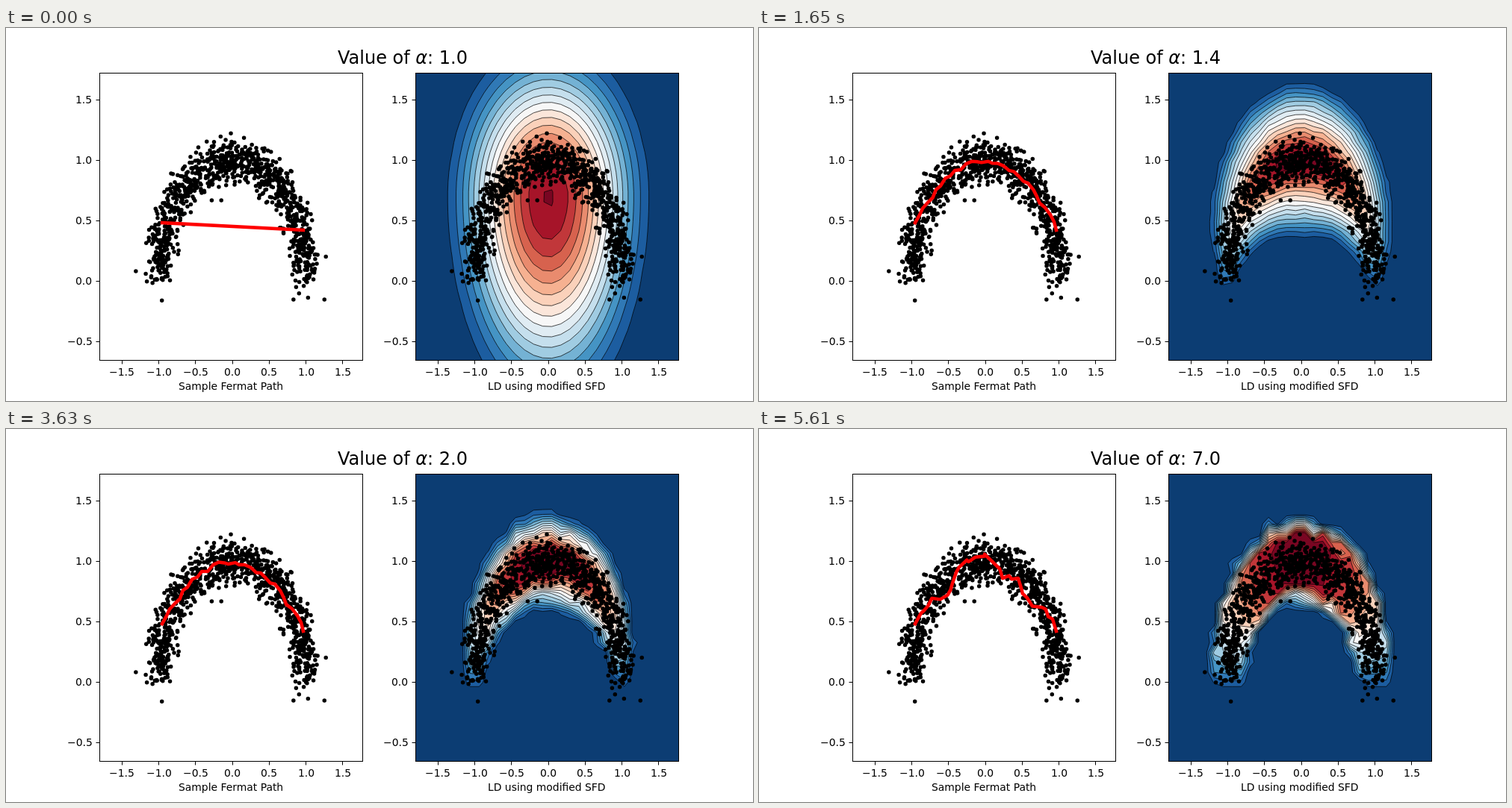
An HTML page with a canvas that plays this animation: 1000x500 px, repeating every 5940 ms.

```html
<!DOCTYPE html>
<html lang="en">
<head>
<meta charset="utf-8">
<title>Fermat path and lens depth</title>
<style>
html, body { margin: 0; width: 100%; height: 100%; overflow: hidden; background: #fff; }
canvas { display: block; width: 1000px; height: 500px; }
</style>
</head>
<body>
<canvas id="stage" width="1000" height="500"></canvas>
<script>
const ctx = document.getElementById('stage').getContext('2d');
const STEP = 330;
const ALPHAS = ['1.0', '1.05', '1.1', '1.2', '1.3', '1.4', '1.5', '1.6', '1.7',
  '1.8', '1.9', '2.0', '2.5', '3.0', '4.0', '5.0', '6.0', '7.0'];
const FONT = '"DejaVu Sans", Verdana, sans-serif';
const TOP = 60.5, W = 352, H = 385, LEFT = 125.5, RIGHT = 548.5;
const UNIT_X = 98.6, UNIT_Y = 162, ZERO_X = 177.5, ZERO_Y = 339;
const BANDS = 17, CELLS = 29;

const mix = (a, b, t) => a + (b - a) * t;
const toX = (left, x) => left + ZERO_X + UNIT_X * x;
const toY = y => ZERO_Y - UNIT_Y * y;

function random(seed) {
  return () => {
    seed = seed + 0x6D2B79F5 | 0;
    let t = Math.imul(seed ^ seed >>> 15, 1 | seed);
    t = t + Math.imul(t ^ t >>> 7, 61 | t) ^ t;
    return ((t ^ t >>> 14) >>> 0) / 4294967296;
  };
}

// Point cloud: a noisy half circle and a few stragglers, in data units
const dots = [[-1.31, 0.08], [1.25, -0.155], [0.83, -0.155], [1.27, 0.2],
  [-0.28, 0.667], [-0.15, 0.667], [0.41, 0.72], [-0.02, 1.22]];
const rnd = random(11);
while (dots.length < 1000) {
  const a = Math.PI * rnd();
  const r = Math.sqrt(-2 * Math.log(1 - rnd())), b = 2 * Math.PI * rnd();
  if (r < 2.35) dots.push([Math.cos(a) + 0.1 * r * Math.cos(b), Math.sin(a) + 0.1 * r * Math.sin(b)]);
}

// Shortest path: a chord at first, then a wandering arc that rises to the ridge
function fermatPath(alpha) {
  const from = [-0.953, 0.481], to = [0.963, 0.42];
  if (alpha === 1) return [from, to];
  const angle = p => Math.atan2(p[1], p[0]);
  const lag = Math.max(0, 1.4 - alpha) / 0.3;
  const radius = 1 - 0.18 * lag * lag - 0.006 * Math.max(0, alpha - 2);
  const sway = 0.02 + 0.009 * (alpha - 1);
  const steps = 30, noise = random(40 + Math.max(2, Math.ceil(alpha)));
  const points = [from];
  let drift = 0;
  for (let i = 1; i < steps; i++) {
    const u = i / steps, ease = Math.min(1, 7 * Math.min(u, 1 - u));
    drift = drift * 0.6 + (noise() - 0.5) * 2 * sway;
    const r = mix(1.06, radius + drift, ease);
    const a = mix(angle(from), angle(to), u) + (noise() - 0.5) * sway;
    points.push([r * Math.cos(a), r * Math.sin(a)]);
  }
  return points.concat([to]);
}

// Depth around one oval centre
function ovalDepth(x, y) {
  const dy = y - 0.7;
  const r = Math.hypot(x / 1.62, dy / (dy > 0 ? 1.55 : 2.15));
  return 8.05 * (1 + Math.cos(Math.PI * Math.min(1, r)));
}

// Depth along the arch: falls toward the feet and away from the ridge
function archDepth(x, y, alpha, wobble) {
  const along = y > 0 ? Math.atan2(Math.abs(x), y) : Math.PI / 2 - y;
  const away = Math.abs(Math.hypot(x, Math.max(0, y)) - 1);
  const core = 0.02 + 0.06 * Math.min(1, alpha - 1) + 0.005 * Math.max(0, alpha - 2) ** 2;
  const edge = Math.max(0.16, 1.125 / alpha - 0.16 - core);
  const shift = wobble * 0.03 * Math.min(1.5, alpha - 1);
  const ridge = 16.8 * (1 - (along / 1.66) ** 2);
  return Math.max(0, ridge - 16 / edge * Math.max(0, away + shift - core));
}

function field(alpha) {
  const oval = Math.max(0, 1 - (alpha - 1) / 0.4) ** 1.8;
  const gain = 1 + 0.25 * oval * (1 - oval);
  const noise = random(5);
  const rows = [];
  for (let j = 0; j <= CELLS; j++) {
    const row = [];
    for (let i = 0; i <= CELLS; i++) {
      const px = RIGHT + i * W / CELLS, py = TOP + j * H / CELLS;
      const x = (px - toX(RIGHT, 0)) / UNIT_X, y = (ZERO_Y - py) / UNIT_Y;
      const arch = archDepth(x, y, alpha, noise() * 2 - 1);
      row.push([px, py, gain * mix(arch, ovalDepth(x, y), oval)]);
    }
    rows.push(row);
  }
  return rows;
}

const stops = ['053061', '2166ac', '4393c3', '92c5de', 'd1e5f0', 'f7f7f7',
  'fddbc7', 'f4a582', 'd6604d', 'b2182b', '67001f']
  .map(h => [0, 2, 4].map(i => parseInt(h.slice(i, i + 2), 16)));

function bandColor(band) {
  const u = (band + 0.4) / (BANDS - 0.2) * 10, i = Math.floor(u);
  return `rgb(${stops[i].map((c, n) => Math.round(mix(c, stops[i + 1][n], u - i)))})`;
}

// Adds the part of one grid cell above the level, and its contour line
function cutCell(quad, level, area, lines) {
  const kept = [], cuts = [];
  quad.forEach((p, n) => {
    const q = quad[(n + 1) % 4];
    if (p[2] >= level) kept.push(p);
    if (p[2] >= level !== q[2] >= level) {
      const t = (level - p[2]) / (q[2] - p[2]);
      const c = [mix(p[0], q[0], t), mix(p[1], q[1], t)];
      kept.push(c);
      cuts.push(c);
    }
  });
  if (!kept.length) return;
  kept.forEach((p, n) => n ? area.lineTo(p[0], p[1]) : area.moveTo(p[0], p[1]));
  area.closePath();
  cuts.forEach((c, n) => n % 2 ? lines.lineTo(c[0], c[1]) : lines.moveTo(c[0], c[1]));
}

function drawDepth(alpha) {
  const rows = field(alpha), lines = new Path2D();
  ctx.fillStyle = bandColor(0);
  ctx.fillRect(RIGHT, TOP, W, H);
  for (let level = 1; level < BANDS; level++) {
    const area = new Path2D();
    for (let j = 0; j < CELLS; j++) {
      for (let i = 0; i < CELLS; i++) {
        const quad = [rows[j][i], rows[j][i + 1], rows[j + 1][i + 1], rows[j + 1][i]];
        cutCell(quad, level, area, lines);
      }
    }
    ctx.fillStyle = bandColor(level);
    ctx.fill(area);
  }
  ctx.strokeStyle = '#000';
  ctx.lineWidth = 0.7;
  ctx.stroke(lines);
}

function drawDots(left) {
  ctx.fillStyle = '#000';
  ctx.beginPath();
  for (const [x, y] of dots) {
    const px = toX(left, x), py = toY(y);
    ctx.moveTo(px + 2.75, py);
    ctx.arc(px, py, 2.75, 0, 7);
  }
  ctx.fill();
}

function drawPath(points) {
  ctx.strokeStyle = '#f00';
  ctx.lineWidth = 4.5;
  ctx.lineJoin = 'round';
  ctx.lineCap = 'square';
  ctx.beginPath();
  points.forEach(([x, y]) => ctx.lineTo(toX(LEFT, x), toY(y)));
  ctx.stroke();
  ctx.lineCap = 'butt';
}

// Text starts on whole pixels; align is 0.5 for centred, 1 for right
function drawText(text, x, y, align) {
  ctx.fillText(text, Math.round(x - ctx.measureText(text).width * align), y);
}

function drawAxes(left, label) {
  const number = v => (v < 0 ? '\u2212' : '') + Math.abs(v).toFixed(1);
  ctx.strokeStyle = ctx.fillStyle = '#000';
  ctx.lineWidth = 1;
  ctx.lineJoin = 'miter';
  ctx.strokeRect(left, TOP, W, H);
  ctx.font = '13.9px ' + FONT;
  ctx.beginPath();
  for (let v = -1.5; v <= 1.5; v += 0.5) {
    const x = toX(left, v), px = Math.floor(x) + 0.5;
    ctx.moveTo(px, TOP + H);
    ctx.lineTo(px, TOP + H + 5);
    drawText(number(v), x, 466, 0.5);
  }
  drawText(label, left + W / 2 - 0.5, 485, 0.5);
  for (let v = -0.5; v <= 1.5; v += 0.5) {
    const y = toY(v);
    ctx.moveTo(left, y + 0.5);
    ctx.lineTo(left - 5, y + 0.5);
    drawText(number(v), left - 10, y + 5, 1);
  }
  ctx.stroke();
}

function drawTitle(alpha) {
  const parts = [['Value of ', ''], ['\u03b1', 'italic '], [': ' + alpha, '']];
  const width = ([text, style]) => {
    ctx.font = style + '24px ' + FONT;
    return ctx.measureText(text).width;
  };
  ctx.fillStyle = '#000';
  let x = Math.round(530.5 - parts.reduce((sum, p) => sum + width(p), 0) / 2);
  for (const p of parts) {
    const w = width(p);
    ctx.fillText(p[0], x, 48);
    x += w;
  }
}

function draw(label) {
  const alpha = Number(label);
  ctx.fillStyle = '#fff';
  ctx.fillRect(0, 0, 1000, 500);
  drawDots(LEFT);
  drawPath(fermatPath(alpha));
  drawDepth(alpha);
  drawDots(RIGHT);
  drawAxes(LEFT, 'Sample Fermat Path');
  drawAxes(RIGHT, 'LD using modified SFD');
  drawTitle(label);
}

let shown = -1;
const begin = performance.now();
function tick() {
  const index = Math.floor((performance.now() - begin) / STEP) % ALPHAS.length;
  if (index !== shown) draw(ALPHAS[shown = index]);
  requestAnimationFrame(tick);
}
tick();
</script>
</body>
</html>
```
